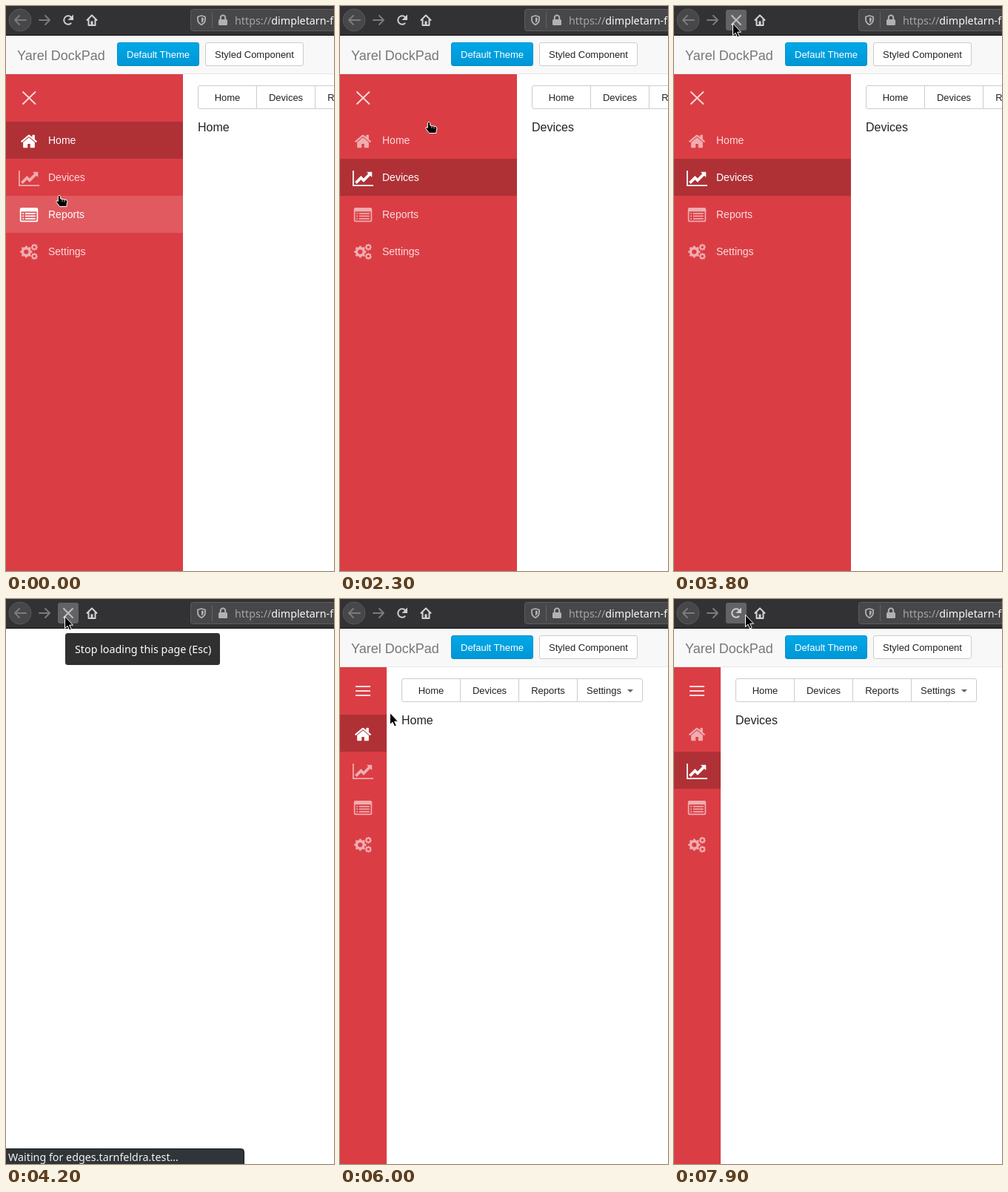
These frames come from a looping animation (443x762 px, 8000 ms). An HTML page:

```html
<!DOCTYPE html>
<html lang="en">
<head>
<meta charset="utf-8">
<title>Side navigation</title>
<style>
  html, body { margin: 0; width: 100%; height: 100%; overflow: hidden; background: #fff; }
  svg { display: block; width: 443px; height: 762px; }
  text { font-family: "Liberation Sans", Arial, sans-serif; white-space: pre; }
  .ui { font-family: "Noto Sans", sans-serif; font-size: 14.3px; }
  .line { fill: none; stroke-width: 2; stroke-linecap: round; stroke-linejoin: round; }
</style>
</head>
<body>
<svg id="stage" viewBox="0 0 443 762"></svg>
<script>
const LOOP = 8000, STEP = 100;
const RED = '#db3d44', PALE = '#f9dcdd';
const LABELS = ['Home', 'Devices', 'Reports', 'Settings'];
const HOME = 0, DEVICES = 1, REPORTS = 2;

// Pointer tip: time, x, y
const POINTER = [
  [0, 72, 255], [500, 101, 254], [900, 101, 254], [1000, 166, 281], [1100, 166, 281],
  [1200, 150, 234], [2200, 150, 234], [2300, 120, 156], [2600, 105, 75], [2900, 84, 22],
  [3300, 84, 22], [3800, 79, 23], [5500, 79, 23], [5700, 100, 60], [6100, 56, 184],
  [6200, 56, 184], [6800, 50, 234], [7500, 50, 236], [7700, 112, 100], [7900, 96, 21], [8000, 96, 21],
];

const ramp = (t, from, to) => Math.min(1, Math.max(0, (t - from) / (to - from)));
const between = (t, from, to) => t >= from && t < to;

function pointerAt(t) {
  const i = POINTER.findIndex(key => key[0] > t);
  const [t0, x0, y0] = POINTER[i - 1], [t1, x1, y1] = POINTER[i];
  const k = ramp(t, t0, t1);
  return [x0 + (x1 - x0) * k, y0 + (y1 - y0) * k];
}

const rect = (x, y, w, h, fill, extra = '') =>
  `<rect x="${x}" y="${y}" width="${w}" height="${h}" fill="${fill}" ${extra}/>`;
const line = (d, color, extra = '') => `<path class="line" d="${d}" stroke="${color}" ${extra}/>`;
const text = (x, y, size, fill, str, extra = '') =>
  `<text x="${x}" y="${y}" font-size="${size}" fill="${fill}" ${extra}>${str}</text>`;
const uiText = (x, y, fill, str) => `<text class="ui" x="${x}" y="${y}" fill="${fill}">${str}</text>`;

// Icons on a 1792-unit em, drawn at 24.5 px
const glyph = (x, y, d) =>
  `<path transform="translate(${x} ${y}) scale(${24.5 / 1792})" fill-rule="evenodd" d="${d}"/>`;
const box = (x, y, w, h) => `M${x} ${y}h${w}v${h}h${-w}z`;

const housePath = 'M1472 992v480q0 26-19 45t-45 19h-384v-384h-256v384h-384q-26 0-45-19t-19-45v-480l576-480z' +
  'M1695 923l-62 74q-8 9-21 11-13 1-24-7l-692-577-692 577q-12 8-24 7-13-2-21-11l-62-74q-15-25 4-45' +
  'l719-599q32-26 76-26t76 26l244 204v-195q0-32 32-32h192q32 0 32 32v408l219 182q20 18 4 45z';
const chartPath = 'M2048 1536v128h-2048v-1536h128v1408zM1920 288v435q0 21-19.5 29.5t-35.5-7.5l-121-121-633 633' +
  'q-23 20-46 0l-233-233-416 416-192-192 585-585q23-20 46 0l233 233 464-464-121-121q-16-16-7.5-35.5t29.5-19.5h435q32 0 32 32z';
const listPath = 'M160 128h1472q160 0 160 160v1088q0 160-160 160h-1472q-160 0-160-160v-1088q0-160 160-160z' +
  box(128, 512, 1536, 896) +
  [640, 896, 1152].map(y => box(256, y, 128, 128) + box(512, y, 1024, 128)).join('');

const gear = (x, y, r) => `<g transform="translate(${x} ${y}) scale(${r / 8})" fill="none">
  <circle r="5" stroke-width="3.6"/>
  <circle r="7" stroke-width="2.6" pathLength="16" stroke-dasharray="1" stroke-dashoffset=".5"/></g>`;

function navIcon(i, y) {
  if (i === 0) return glyph(18.75, y + 14.2, housePath);
  if (i === 1) return glyph(17, y + 14.2, chartPath);
  if (i === 2) return glyph(18.75, y + 14.2, listPath);
  return gear(27.3, y + 25.5, 7.8) + gear(38.3, y + 19.3, 4.4) + gear(38.3, y + 31.6, 4.4);
}

function browserBar(t, [px, py]) {
  const enabled = !between(t, 5000, 5600);
  const hovered = enabled && px >= 70 && px < 98 && py < 33;
  const stop = t < 4500 ? ramp(t, 3200, 3600) : 1 - ramp(t, 5000, 5400);
  const color = enabled ? '#cfcfd1' : '#7b7b7d';
  const spin = k => `opacity="${k}" transform="rotate(${(1 - k) * 90} 84 19)"`;
  return rect(0, 0, 443, 40, '#323234') + rect(0, 39, 443, 1, '#0c0c0d') +
    '<circle cx="19" cy="19" r="15" fill="#474749" stroke="#58585a"/>' +
    line('M27 19H12M18 13l-6 6 6 6', '#7b7b7d') +
    line('M45 19H59M53 13l6 6-6 6', '#7b7b7d') +
    (hovered ? rect(70, 5, 28, 28, '#636365', 'rx="3"') : '') +
    `<g ${spin(1 - stop)}>` + line('M87.6 23.4A5.7 5.7 0 1 1 88 15', color) +
    `<path d="M91 11.5v7.5h-7.5z" fill="${color}"/></g>` +
    `<g ${spin(stop)}>` + line('M78 13l12 12M90 13L78 25', enabled ? '#bebec0' : color) + '</g>' +
    line('M109.5 19l6.5-6.5 6.5 6.5M111.5 18.5v7.5h9v-7.5', '#d3d3d5') +
    rect(114.5, 20.5, 3, 5.5, '#d3d3d5') +
    rect(249.5, 4.5, 210, 29, '#474749', 'rx="3" stroke="#5c5c5e"') +
    line('M264 13l5 1.5v4q0 4-5 6.8-5-2.8-5-6.8v-4z', '#b1b1b3', 'style="stroke-width:1.8"') +
    '<path d="M264 15.5l2.8.8v2.5q0 2.3-2.8 4z" fill="#b1b1b3"/>' +
    rect(278, 8, 1, 22, '#646466') +
    rect(287, 18, 12, 8, '#b1b1b3', 'rx="1.5"') + line('M289.8 18v-2.2a3.2 3.2 0 0 1 6.4 0V18', '#b1b1b3') +
    uiText(309, 25, '#a5a5a8', 'https://<tspan fill="#f9f9fa">dimpletarn-f</tspan>');
}

function header() {
  return rect(0, 40, 443, 52, '#f8f8f8') + rect(0, 91, 443, 1, '#e7e7e7') +
    text(15, 73, 18, '#777', 'Yarel DockPad') +
    '<linearGradient id="blue" x2="0" y2="1"><stop stop-color="#00a8e8"/><stop offset="1" stop-color="#0096d5"/></linearGradient>' +
    rect(150.5, 49.5, 110, 31, 'url(#blue)', 'rx="2.5" stroke="#0090cc"') +
    text(163, 70, 13, '#fff', 'Default Theme') +
    rect(269.5, 49.5, 132, 31, '#fff', 'rx="2.5" stroke="#ccc"') +
    text(282, 70, 13, '#222', 'Styled Component');
}

function sidebar(t, wide, active) {
  const width = wide ? 239 : 63;
  const hover = [0, 0, 0, 0];
  if (t < 1200) {
    hover[DEVICES] = ramp(t, 0, 400);
    hover[REPORTS] = 1 - hover[DEVICES];
  } else if (t > 5000) {
    hover[DEVICES] = ramp(t, 6300, 6700);
  }
  const rows = LABELS.map((label, i) => {
    const y = 156 + 50 * i, on = i === active;
    const fill = on ? 'rgba(0,0,0,.2)' : `rgba(255,255,255,${0.15 * hover[i]})`;
    const lit = on ? 1 : hover[i];
    const color = lit > 0.5 ? '#fff' : PALE;
    return rect(0, y, width, 50, fill) +
      `<g fill="${color}" stroke="none" opacity="${0.7 + 0.3 * lit}"><g ${i === 3 ? `stroke="${color}"` : ''}>${navIcon(i, y)}</g></g>` +
      (wide ? text(57, y + 30, 14, color, label) : '');
  });
  const toggle = wide ? 'M22.5 115.5l17.5 17M40 115.5l-17.5 17' : 'M21 118H41M21 124H41M21 130H41';
  return rect(0, 92, width, 670, RED) + line(toggle, PALE, 'style="stroke-width:1.8;stroke-linecap:butt"') + rows.join('');
}

function content(left, active) {
  const tabs = LABELS.map((label, i) =>
    text(left + 40 + 79 * i + (i === 3 ? -3.5 : 0), 128, 13, '#222', label, 'text-anchor="middle"') +
    (i ? rect(left + 79 * i, 107, 1, 32, '#ccc') : ''));
  return rect(left + 0.5, 107.5, 325, 31, '#fff', 'rx="2.5" stroke="#ccc"') + tabs.join('') +
    `<path d="M${left + 305} 122h8l-4 4z" fill="#666"/>` +
    text(left, 169, 16, '#222', LABELS[active]);
}

function statusBar(t) {
  const verb = t < 4800 ? 'Waiting for' : 'Transferring data from';
  return '<path d="M-1 763V741.5H317.500q4 0 4 4V763z" fill="#2f3538" stroke="#16191a"/>' +
    uiText(3, 758, '#f2f2f2', verb + ' edges.tarnfeldra.test…');
}

function tooltip() {
  return rect(80, 46, 209, 43, '#303030', 'rx="3.5"') + uiText(93, 73, '#fff', 'Stop loading this page (Esc)');
}

function pointer([x, y], wide) {
  const hand = y > 150 && y < 356 && x < (wide ? 239 : 63);
  const shape = hand
    ? '<path d="M-1.700 1.500Q0-1.200 1.700 1.500V5L9 6.500Q11 7 11 9L10 12.500V15.500H0.500L-4 9.500Q-4.300 7-2.800 7.500L-1.700 8.500Z"/>' +
      '<path d="M4 6v3M7 6.500v3" stroke-width=".7"/>'
    : '<path d="M.500.500V16.500L4 13.200 6.600 19 9.200 17.800 6.700 12.200H11.500Z"/>';
  return `<g transform="translate(${x} ${y})" fill="#000" stroke="#fff">${shape}</g>`;
}

function scene(t) {
  const tip = pointerAt(t);
  const wide = t < 4100, blank = between(t, 4100, 5000);
  const active = between(t, 1200, 5000) || t >= 7200 ? DEVICES : HOME;
  const page = blank ? '' : header() + sidebar(t, wide, active) + content(wide ? 259 : 83, active);
  return rect(0, 0, 443, 762, '#fff') + page + browserBar(t, tip) +
    (between(t, 4000, 5000) ? statusBar(t) : '') +
    (between(t, 4100, 5000) ? tooltip() : '') +
    pointer(tip, wide);
}

const stage = document.getElementById('stage');
let shown = -1;
function draw() {
  const t = Math.floor(performance.now() % LOOP / STEP) * STEP;
  if (t !== shown) stage.innerHTML = scene(shown = t);
  requestAnimationFrame(draw);
}
draw();
</script>
</body>
</html>
```
